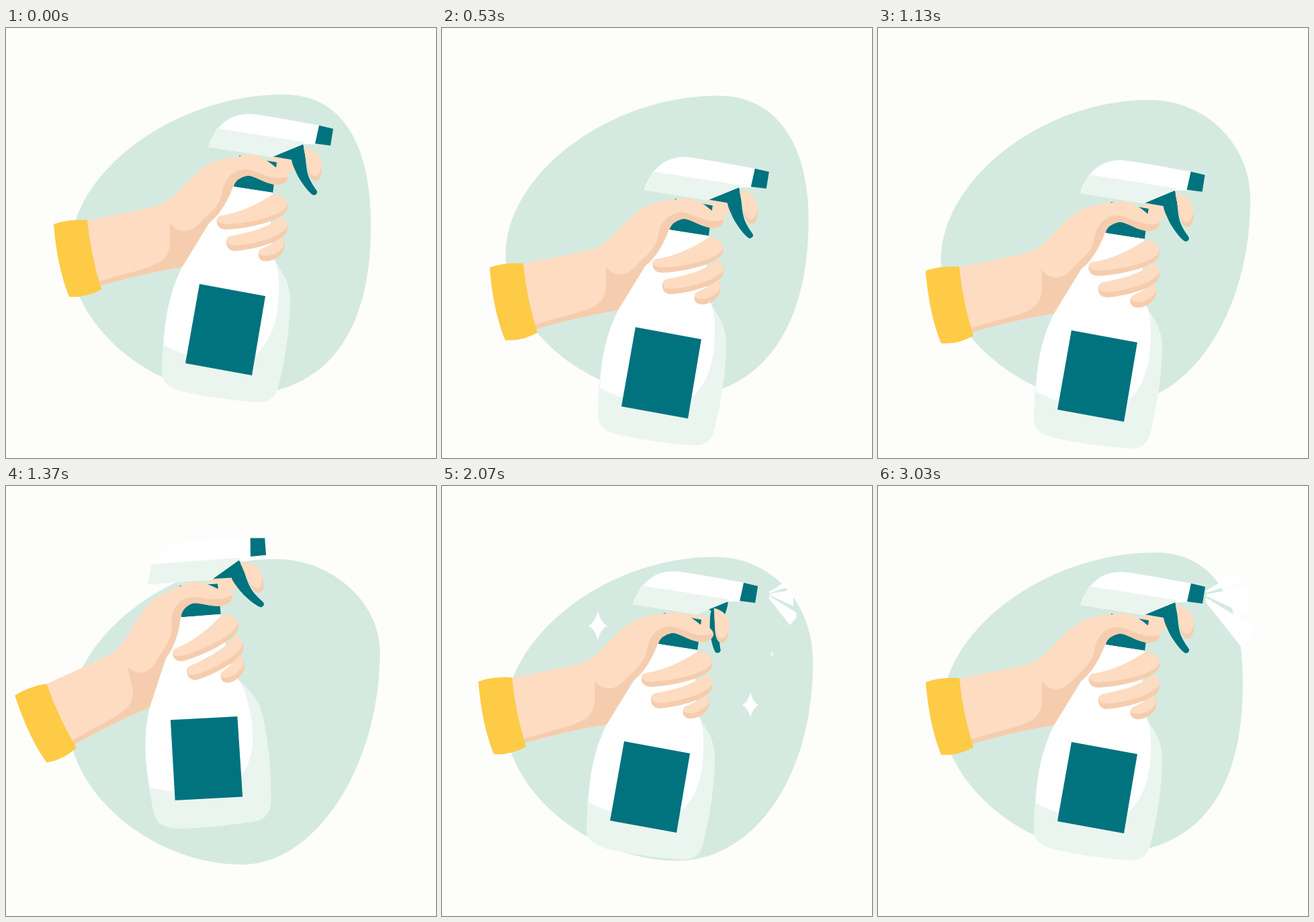
An HTML page for the animation above (3060 ms loop, 640 px wide and 640 px high).

```html
<!DOCTYPE html>
<html lang="en">
<head>
<meta charset="utf-8">
<title>Spray bottle</title>
<style>
  html, body { margin: 0; width: 100%; height: 100%; overflow: hidden; background: #fdfdfc; }
  svg { display: block; width: 100vw; height: 100vh; }
  .skin { fill: #fddcc2; }
  .shade { fill: #f5cdae; }
  .white { fill: #fff; }
  .tint { fill: #ebf5f0; }
  .dark { fill: #01737e; }
</style>
</head>
<body>
<svg viewBox="0 0 640 640">
  <path id="blob" fill="#d4eae0"/>
  <g id="stars" class="white"></g>
  <g id="spray" class="white">
    <path d="M488 156 L530 130 L540 142 L489 159Z"/>
    <path d="M489 161 L550 150 L550 192 L489 164Z"/>
    <path d="M488 166 L557 208 L557 222 L541 240 L488 173Z"/>
  </g>
  <g id="hand">
    <path id="knuckle" class="skin" d="M393 191 L427 196 Q432 206 429 214 L398 213Z"/>
    <path id="trigger" class="dark" d="M396 191 L442 173 C447 187 445 204 450 220 C454 231 460 238 463 243 Q464 248 458 249 C451 246 436 226 431 213 Q426 203 425 196Z"/>
    <g id="fingertip">
      <path class="shade" d="M443 178 C460 178 471 193 470 208 C470 222 465 229 459 227 C451 224 449 210 447 198Z"/>
      <path class="skin" d="M443 178 C460 178 471 193 470 205 C467 218 462 223 456 219 C450 214 449 205 447 198Z"/>
    </g>

    <!-- spray head and collar -->
    <path class="white" d="M301 177 C310 151 328 126 365 128 Q380 129 466 145 L461 173 L442 173 L396 192Z"/>
    <path class="tint" d="M301 177 L314 149 L446 170 L442 173 L396 192Z"/>
    <path class="dark" d="M466 145 L487 150 L483 175 L460 172Z"/>
    <path class="dark" d="M347 190 L403 200 L397 246 L339 236Z"/>

    <!-- bottle -->
    <path class="tint" d="M338 236 L397 245 C392 290 393 325 399 343 C406 360 424 375 423 408 C422 455 414 500 405 535 Q399 557 376 557 Q315 553 262 541 Q231 533 232 512 C233 450 240 400 262 356 L303 290 Q326 270 338 236Z"/>
    <path class="white" d="M338 236 L397 245 C392 290 393 325 399 343 Q406 358 406 380 C407 420 400 458 376 482 Q350 500 262 484 Q248 478 235 472 C237 425 245 391 262 356 L303 290 Q326 270 338 236Z"/>
    <path class="dark" d="M288 381 L386 399 L366 517 L267 499Z"/>

    <!-- arm and thumb -->
    <path class="skin" d="M114 288 C160 278 205 271 229 263 C258 250 273 216 306 200 Q326 192 348 191 C370 185 382 191 401 207 Q421 211 421 223 Q417 235 399 233 C381 230 368 218 358 220 Q343 223 338 236 C328 261 317 279 302 290 L262 356 Q199 366 136 385Z"/>
    <path class="shade" d="M244 290 C257 309 278 305 292 286 C308 272 320 260 322 244 C327 218 344 210 357 210 C377 212 393 229 420 221 Q418 235 399 233 C381 230 368 218 358 220 Q343 223 338 236 C328 261 317 279 302 290 L262 356 Q199 366 136 385 L136 378 C180 364 213 359 231 347 C249 334 243 312 244 290Z"/>

    <!-- lower fingers -->
    <g class="shade">
      <path d="M318 280 C350 275 375 262 395 249 C410 244 420 256 419 268 C417 285 370 297 330 300 C312 301 310 284 318 280Z"/>
      <path d="M333 310 C360 305 390 298 408 282 C418 282 421 295 418 304 C412 318 370 330 340 332 C326 331 325 314 333 310Z"/>
      <path d="M380 329 C392 324 402 318 411 311 C416 318 416 330 410 336 C404 344 392 348 384 347 C374 345 373 333 380 329Z"/>
    </g>
    <g class="skin">
      <path d="M318 280 C350 275 375 262 395 249 C410 244 420 256 418 265 C410 280 366 290 330 292 Q318 292 314 287 Q314 282 318 280Z"/>
      <path d="M333 310 C360 305 390 298 408 282 C418 282 421 293 418 297 C408 311 370 322 341 324 Q331 324 329 318 Q330 312 333 310Z"/>
      <path d="M380 329 C392 324 402 318 411 311 Q416 321 412 327 C404 335 394 340 384 339 Q377 338 376 335 Q376 331 380 329Z"/>
    </g>

    <path fill="#fdcb45" d="M71 292 Q94 284 121 286 Q126 338 142 389 Q119 402 94 400 C81 368 74 330 71 292Z"/>
  </g>
</svg>
<script>
const LOOP = 3060;
const el = id => document.getElementById(id);
const move = (id, value) => el(id).setAttribute("transform", value);
const mix = (a, b, u) => a + (b - a) * u;
const ease = u => (1 - Math.cos(Math.PI * u)) / 2;
const ramp = (t, from, to) => ease(Math.min(1, Math.max(0, (t - from) / (to - from))));
const pulse = (t, rise, full, fade, gone) => ramp(t, rise, full) * (1 - ramp(t, fade, gone));

// Turning points of the shake; the bottle tilts only while it is raised.
const beats = [
  { at: 0, lift: 0, tilt: 0 },
  { at: 215, lift: -93, tilt: -11.3 },
  { at: 490, lift: 71, tilt: 0 },
  { at: 790, lift: -78, tilt: -10 },
  { at: 1085, lift: 75, tilt: 0 },
  { at: 1410, lift: -48, tilt: -14.2 },
  { at: 1920, lift: 26, tilt: 0 },
  { at: 2060, lift: -1, tilt: 0 },
  { at: LOOP, lift: 0, tilt: 0 }
];

function shake(t) {
  const i = beats.findIndex(beat => beat.at > t);
  const a = beats[i - 1], b = beats[i], u = ramp(t, a.at, b.at);
  return {
    lift: mix(a.lift, b.lift, u),
    tilt: a.tilt * (1 - u) ** 1.74 + b.tilt * u ** 1.74
  };
}

// Four extreme points joined by curves that reach toward the corners of the box.
function drawBlob(t) {
  const m = ease(2 * t / LOOP) ** 1.3;
  const top = [mix(413, 402, m), mix(99, 109, m)];
  const right = [mix(543, 557, m), mix(295, 245, m)];
  const bottom = [mix(345, 352, m), mix(546, 564, m)];
  const left = [mix(95, 93, m), mix(335, 350, m)];
  const toward = (p, corner, reach) => p.map((v, i) => mix(v, corner[i], reach));
  const curve = (from, to, corner, reach) =>
    `C${toward(from, corner, reach)} ${toward(to, corner, reach)} ${to}`;
  const wide = mix(0.65, 0.53, m), soft = 0.51;
  el("blob").setAttribute("d", `M${top}` +
    curve(top, right, [right[0], top[1]], wide) +
    curve(right, bottom, [right[0], bottom[1]], wide) +
    curve(bottom, left, [left[0], bottom[1]], soft) +
    curve(left, top, [left[0], top[1]], soft));
}

const stars = [
  { x: 232, y: 208, rx: 14, ry: 22, life: [1840, 2020, 2380, 2760] },
  { x: 459, y: 326, rx: 12, ry: 19, life: [1880, 2060, 2220, 2560] },
  { x: 491, y: 250, rx: 4, ry: 8, life: [1990, 2160, 2640, 2900] }
];
el("stars").innerHTML = stars.map((_, i) =>
  `<path id="star${i}" d="M1 0Q.25 .25 0 1Q-.25 .25 -1 0Q-.25 -.25 0 -1Q.25 -.25 1 0Z"/>`).join("");

function drawStar({ x, y, rx, ry, life }, i, t) {
  const glow = pulse(t, ...life), size = mix(0.6, 1, glow);
  move(`star${i}`, `translate(${x} ${y}) scale(${rx * size} ${ry * size})`);
  el(`star${i}`).setAttribute("opacity", glow);
}

function draw(t) {
  drawBlob(t);

  const { lift, tilt } = shake(t);
  const recoil = 19 * pulse(t, 1930, 2110, 2110, 2380) + 11 * pulse(t, 2540, 2720, 2720, 2980);
  const dx = -recoil - 0.16 * tilt * tilt;
  move("hand", `translate(${dx} ${lift}) rotate(${tilt} 327 449)`);

  const press = pulse(t, 1920, 2050, 2250, 2420) + pulse(t, 2440, 2600, 2800, 2980);
  move("trigger", `rotate(${25.5 * press} 441 175)`);
  move("fingertip", `translate(${-25 * press} ${7 * press}) rotate(${8 * press} 458 203)`);
  move("knuckle", `translate(${-13 * press} 0)`);

  move("spray", `translate(485 160) scale(${ramp(t, 1960, 2160)}) translate(-485 -160)`);
  stars.forEach((star, i) => drawStar(star, i, t));
}

const start = performance.now();
function tick() {
  draw((performance.now() - start) % LOOP);
  requestAnimationFrame(tick);
}
tick();
</script>
</body>
</html>
```
